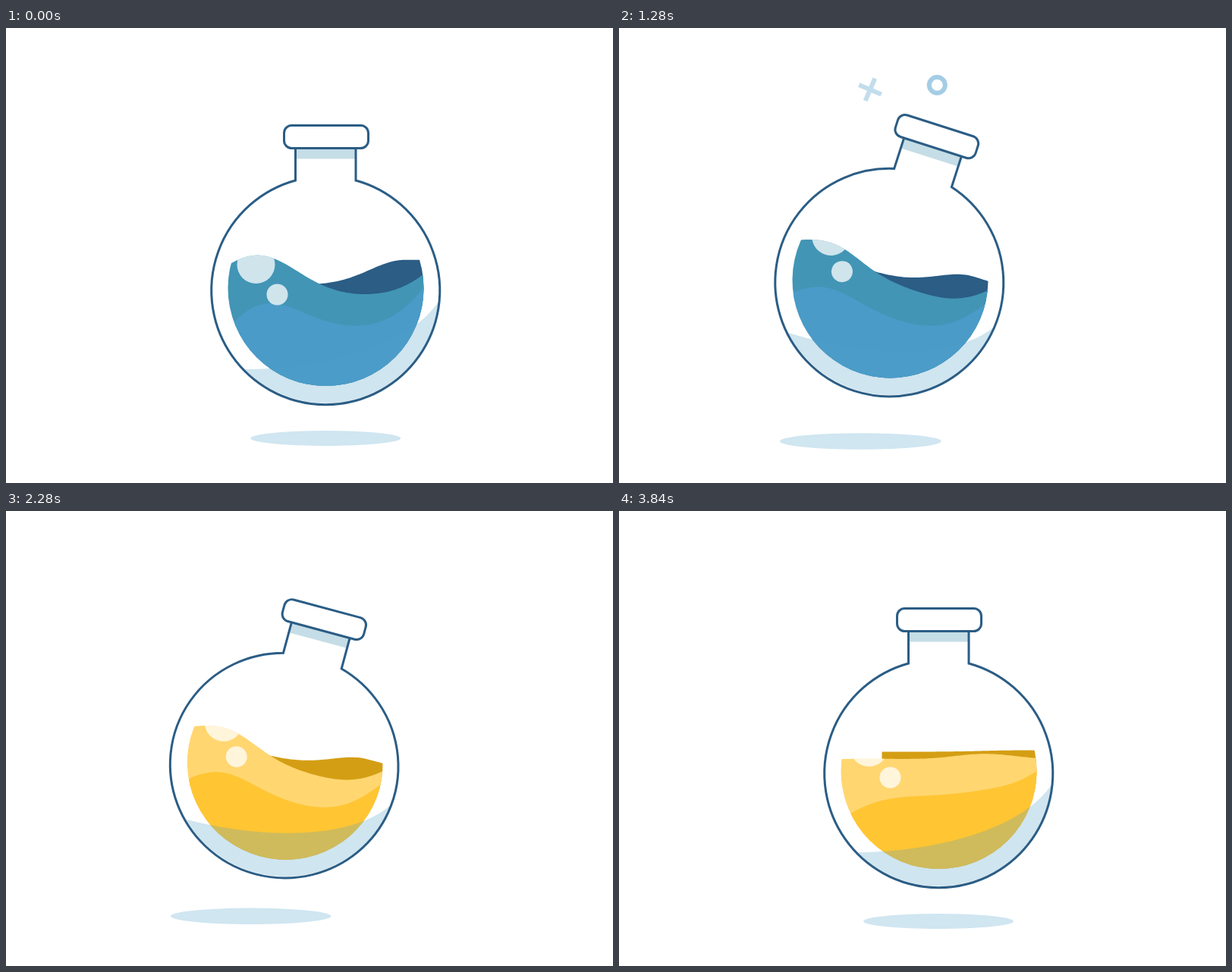
Recreate the animation shown at these times as an HTML page with a canvas. Size 800 by 600 pixels, loop 3.88 s.

```html
<!DOCTYPE html>
<html>
<head>
<meta charset="utf-8">
<style>
html, body { margin: 0; width: 100%; height: 100%; overflow: hidden; background: #fff; }
canvas { display: block; }
</style>
</head>
<body>
<canvas id="stage" width="800" height="600"></canvas>
<script>
const ctx = document.getElementById('stage').getContext('2d');
const LOOP = 3880, STEP = 40, WAVE = 1040, TAU = Math.PI * 2, DEG = Math.PI / 180;
const INK = '#2b5d85', PALE = '#d0e6f1', SPARK = '#86bcdc';

// Moments where the flask turns round; every track has one value per beat.
const BEATS = [0, 600, 1210, 1820, 2413, 3080, 3500, 3840];
const swing = [0, -25, 19.2, -25, 20.5, -12.4, 12, 0];
const squash = [1, .9, 1, .9, 1, 1, 1, 1];
const shadowX = [0, 119, -115, 119, -119, 50, -30, 0];
const shadowY = [541, 495, 545, 495, 550, 543, 541, 541];
const shadowSize = [1, .926, .926, .926, .926, 1.03, 1.03, 1];

const clamp = v => Math.max(0, Math.min(1, v));
const mix = (a, b, p) => a + (b - a) * p;
const ease = p => (1 - Math.cos(clamp(p) * Math.PI)) / 2;
const bell = v => Math.exp(-v * v);

function track(values, t, lag = 0) {
  t -= lag;
  let i = 0;
  while (i < BEATS.length - 2 && t >= BEATS[i + 1]) i++;
  return mix(values[i], values[i + 1], ease((t - BEATS[i]) / (BEATS[i + 1] - BEATS[i])));
}

const blend = (a, b, p) => `rgb(${a.map((v, i) => Math.round(mix(v, b[i], p)))})`;

function fill(path, color) {
  ctx.fillStyle = color;
  ctx.fill(path);
}

function disc(x, y, rx, ry = rx) {
  const path = new Path2D();
  path.ellipse(x, y, rx, ry, 0, 0, TAU);
  return path;
}

// Area below a curve that maps a place to a point.
function below(from, to, point) {
  const path = new Path2D();
  path.moveTo(from, 140);
  for (let x = from; x <= to; x += 3) path.lineTo(...point(x));
  path.lineTo(to, 140);
  return path;
}

const bowl = disc(0, -3, 129);
const bubbles = [disc(-92, -34, 25), disc(-64, 5.5, 14)];
const shade = new Path2D('M-107 104C-10 104 110 75 149 14A150 150 0 0 1 -107 104Z');
const glass = new Path2D('M-40 -187V-145A150.5 150.5 0 1 0 39.5 -145V-187');
const cork = new Path2D();
cork.roundRect(-55, -217.5, 111, 30, 10);

function liquid(t) {
  const phase = t / WAVE % 1, surge = Math.cos(phase * TAU);
  const energy = 1 - .85 * clamp((t - 2680) / 1160);
  const tint = ease((t - 1430) / 360);

  // A crest speeds from the right wall to the left one, where it dies down.
  const crest = (x, age) => {
    const centre = 200 - 290 * Math.min(1, age) ** 2;
    const height = (40 + .16 * Math.abs(centre)) * Math.exp(-3 * Math.max(0, age - 1));
    return height * bell((x - centre) / (62 + 13 * surge));
  };
  const level = x => mix(-21, 8 * surge - crest(x, phase) - crest(x, phase + 1), energy);

  // The back wave climbs the right wall and curls over when it is tall.
  const tall = 57 - 31 * Math.cos(phase * TAU - .7);
  const lean = 1.6 * Math.max(0, tall - 60) * energy ** 2;
  const back = below(-75, 180, x => {
    const rise = bell(Math.min(0, x - 104) / 65);
    return [x - lean * clamp(2.5 * rise - 1.25), -29 + energy ** 2 * (22 - tall * rise)];
  });
  const middle = below(-132, 132, x => [x, level(x)]);
  const front = below(-132, 132, x => [x, 44 + .75 * level(x) - 32 * (x / 129) ** 3]);

  ctx.save();
  ctx.clip(bowl);
  fill(back, blend([43, 93, 133], [212, 158, 20], tint));
  fill(middle, blend([66, 149, 181], [255, 214, 112], tint));
  ctx.clip(middle);
  fill(front, blend([74, 155, 200], [255, 197, 51], tint));
  for (const bubble of bubbles) fill(bubble, 'rgba(255,255,255,.75)');
  ctx.restore();
}

function flask(t) {
  ctx.save();
  ctx.translate(421.5, 133);
  ctx.rotate(track(swing, t) * DEG);
  ctx.scale(1, track(squash, t, 20));
  ctx.translate(0, 213);
  liquid(t);
  fill(shade, 'rgba(77,158,200,.27)');
  ctx.fillStyle = '#c5dde6';
  ctx.fillRect(-39, -187, 78, 13.5);
  ctx.strokeStyle = INK;
  ctx.lineWidth = 3;
  ctx.stroke(glass);
  ctx.stroke(cork);
  ctx.restore();
}

function shadow(t) {
  const x = track(shadowX, t, -20), size = track(shadowSize, t) - x * .00145;
  fill(disc(421 + x, track(shadowY, t, 80), 99 * size, 10 * size), PALE);
}

// Signs that rise from the cork, fading in and out.
function signs(starts, t, draw) {
  for (const start of starts) {
    const age = t - start;
    if (age <= 0 || age >= 480) continue;
    ctx.save();
    ctx.globalAlpha = Math.sin(age / 480 * Math.PI);
    ctx.strokeStyle = SPARK;
    ctx.lineWidth = 6;
    ctx.beginPath();
    draw(age);
    ctx.stroke();
    ctx.restore();
  }
}

function plus(age) {
  ctx.translate(389 - age * .145, 130 - age * .122);
  ctx.rotate(age * .058 * DEG);
  ctx.moveTo(-16, 0);
  ctx.lineTo(16, 0);
  ctx.moveTo(0, -16);
  ctx.lineTo(0, 16);
}

function ring(age) {
  ctx.arc(434 - age * .042, 134 - age * .168, 10.5, 0, TAU);
}

// Three short strokes that shoot out from a centre.
function rays(t, start, x, y, angle, spread, from, to) {
  const p = (t - start) / 320;
  if (p <= 0 || p >= 1) return;
  const outer = mix(from, to, clamp(p * 2)), inner = mix(from, to, clamp(p * 2 - 1));
  ctx.strokeStyle = PALE;
  ctx.lineWidth = 6;
  ctx.lineCap = 'round';
  ctx.beginPath();
  for (const side of [-1, 0, 1]) {
    const turn = (angle + side * spread) * DEG, dx = Math.cos(turn), dy = Math.sin(turn);
    ctx.moveTo(x + dx * inner, y + dy * inner);
    ctx.lineTo(x + dx * outer, y + dy * outer);
  }
  ctx.stroke();
  ctx.lineCap = 'butt';
}

const begin = performance.now();
function frame() {
  const t = Math.floor((performance.now() - begin) % LOOP / STEP) * STEP;
  ctx.clearRect(0, 0, 800, 600);
  shadow(t);
  signs([100, 880, 1615, 2387, 3260], t, plus);
  signs([100, 930, 1615, 2460, 3280], t, ring);
  rays(t, 2960, 400, 156, 220, 20, 60, 97);
  rays(t, 3080, 509, 252, -54, 25, 39, 62);
  flask(t);
  requestAnimationFrame(frame);
}
frame();
</script>
</body>
</html>
```
